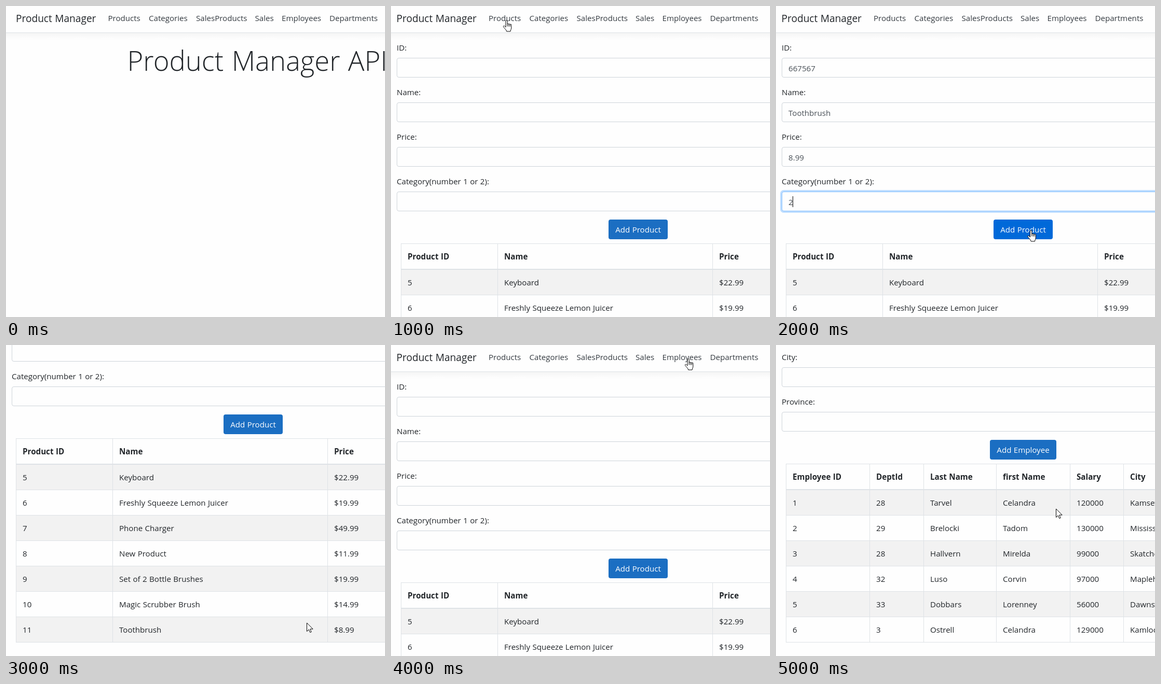
An HTML page that plays this animation: 730 px wide and 600 px high, repeating every 6 s.

```html
<!DOCTYPE html>
<html lang="en">
<head>
<meta charset="utf-8">
<title>Product Manager</title>
<style>
  html, body { margin: 0; width: 100%; height: 100%; overflow: hidden; background: #fefefe; }
  svg { display: block; width: 730px; height: 600px; }
  text { font: 15.1px "Open Sans", "Noto Sans", sans-serif; word-spacing: .03em; fill: #212529; white-space: pre; }
  .brand { font-size: 19.1px; }
  .link { fill: #343a40; }
  .title { font-size: 52.6px; font-weight: 300; }
  .head { font-size: 15.2px; font-weight: 700; }
  .value { fill: #495057; }
  .label { fill: #fff; text-anchor: middle; }
  .line { fill: #dee2e6; }
  .stripe { fill: #f2f2f2; }
  .input { fill: #fefefe; stroke: #ced4da; }
  .focus { stroke: #80bdff; }
  .halo { fill: #bfdeff; }
  .button { fill: #1b6ec2; }
  .hover { fill: #0069d9; }
  .cursor { fill: #fff; stroke: #000; stroke-linejoin: round; stroke-linecap: round; }
</style>
</head>
<body>
<svg id="stage" viewBox="0 0 730 600">
  <defs>
    <linearGradient id="shade" x1="0" y1="0" x2="0" y2="1">
      <stop offset="0" stop-opacity=".037"/>
      <stop offset=".25" stop-opacity=".025"/>
      <stop offset=".6" stop-opacity=".008"/>
      <stop offset="1" stop-opacity="0"/>
    </linearGradient>
  </defs>
</svg>
<script>
const STEP = 1000;
const stage = document.getElementById('stage');

const text = (x, y, str, cls = '') => `<text x="${x}" y="${y}" class="${cls}">${str}</text>`;
const rect = (x, y, w, h, cls, r = 0) =>
  `<rect x="${x}" y="${y}" width="${w}" height="${h}" rx="${r}" class="${cls}"/>`;
const group = (x, y, body) => `<g transform="translate(${x} ${y})">${body}</g>`;

const links = [['Products', 188], ['Categories', 266.5], ['SalesProducts', 357.5],
  ['Sales', 471], ['Employees', 522.5], ['Departments', 614.5]];

const navbar = (shift = 0) =>
  '<rect y="52" width="730" height="16" fill="url(#shade)"/>' + rect(0, 51, 730, 1, 'line') +
  group(shift, 0, text(10.5, 31, 'Product Manager', 'brand') +
    links.map(([name, x]) => text(x, 29, name, 'link')).join(''));

// A labelled text box; y is the top of the box.
const field = (y, name, value = '', focused = false) =>
  text(11, y - 14, name) +
  (focused ? rect(8, y - 3, 740, 44, 'halo', 7) : '') +
  rect(11.5, y + .5, 740, 37, 'input' + (focused ? ' focus' : ''), 3.5) +
  text(24, y + 26, value, 'value') +
  (focused ? '<path d="M32.5 367v21" stroke="#000"/>' : '');

const button = (y, width, name, hovered = false) =>
  rect(476 - width / 2, y, width, 38, 'button' + (hovered ? ' hover' : ''), 4) +
  text(476, y + 25, name, 'label');

function table(top, columns, heads, rows) {
  const rowTop = i => top + 51 + 49 * i;
  const bottom = rowTop(rows.length);
  const cells = (row, y, cls) => row.map((str, c) => text(columns[c] + 13, y, str, cls)).join('');
  return rows.map((row, i) =>
      (i % 2 ? '' : rect(19, rowTop(i), 711, 48, 'stripe')) +
      rect(19, rowTop(i) + 48, 711, 1, 'line') +
      cells(row, rowTop(i) + 30)).join('') +
    rect(19, top, 711, 1, 'line') + rect(19, top + 49, 711, 2, 'line') +
    columns.map(x => rect(x, top, 1, bottom - top, 'line')).join('') +
    cells(heads, top + 31, 'head');
}

const products = [
  ['5', 'Keyboard', '$22.99'],
  ['6', 'Freshly Squeeze Lemon Juicer', '$19.99'],
  ['7', 'Phone Charger', '$49.99'],
  ['8', 'New Product', '$11.99'],
  ['9', 'Set of 2 Bottle Brushes', '$19.99'],
  ['10', 'Magic Scrubber Brush', '$14.99'],
  ['11', 'Toothbrush', '$8.99']
];
const employees = [
  ['1', '28', 'Tarvel', 'Celandra', '120000', 'Kamsett'],
  ['2', '29', 'Brelocki', 'Tadom', '130000', 'Mississauga'],
  ['3', '28', 'Hallvern', 'Mirelda', '99000', 'Skatchewan'],
  ['4', '32', 'Luso', 'Corvin', '97000', 'Maplehurst'],
  ['5', '33', 'Dobbars', 'Lorenney', '56000', 'Dawnsville'],
  ['6', '3', 'Ostrell', 'Celandra', '129000', 'Kamloops']
];
const labels = ['ID:', 'Name:', 'Price:', 'Category(number 1 or 2):'];

const homePage = () => navbar(8.5) + text(233.5, 125, 'Product Manager API', 'title');

function productPage(values = []) {
  const filled = values.length > 0;
  return navbar() +
    labels.map((name, i) => field(100 + 86 * i, name, values[i], filled && i === 3)).join('') +
    button(412, 114, 'Add Product', filled) +
    table(458, [19, 205, 619], ['Product ID', 'Name', 'Price'], products);
}

const employeePage = () =>
  field(43, 'City:') + field(129, 'Province:') + button(183, 128, 'Add Employee') +
  table(229, [19, 180, 284, 424, 566, 669],
    ['Employee ID', 'DeptId', 'Last Name', 'first Name', 'Salary', 'City'], employees);

const arrow = (x, y) => group(x, y,
  '<path class="cursor" d="M.5 .5V16.5L4.2 13L6.8 18.6L9.2 17.5L6.7 12H11.8Z"/>');
const hand = (x, y) => group(x, y,
  `<path class="cursor" d="M5.5 13.5V2.2a1.6 1.6 0 0 1 3.2 0V8a1.4 1.4 0 0 1 2.7 .4
    a1.3 1.3 0 0 1 2.5 .6a1.2 1.2 0 0 1 2.4 .7V15c0 3-1.5 3.8-1.8 7H7.2
    c-.4-3-4-5.6-6-8.6c-1-1.7 .8-3 2.3-1.7ZM8.7 8v4M11.4 8.6v3.6M13.9 9.2v3"/>`);

const scenes = [
  homePage(),
  productPage() + hand(215.5, 27),
  productPage(['667567', 'Toothbrush', '8.99', '2']) + hand(484, 432),
  group(0, -278, productPage()) + arrow(579, 536),
  productPage() + hand(565.5, 26),
  employeePage() + arrow(539, 316)
];
stage.insertAdjacentHTML('beforeend',
  scenes.map(body => `<g class="scene" display="none">${body}</g>`).join(''));

const layers = [...stage.querySelectorAll('.scene')];
const start = performance.now();
let shown = -1;

function show(now) {
  const current = Math.floor(Math.max(0, now - start) / STEP) % layers.length;
  if (current !== shown) {
    layers.forEach((layer, i) => layer.setAttribute('display', i === current ? 'inline' : 'none'));
    shown = current;
  }
}
function tick(now) {
  show(now);
  requestAnimationFrame(tick);
}
show(start);
requestAnimationFrame(tick);
</script>
</body>
</html>
```
